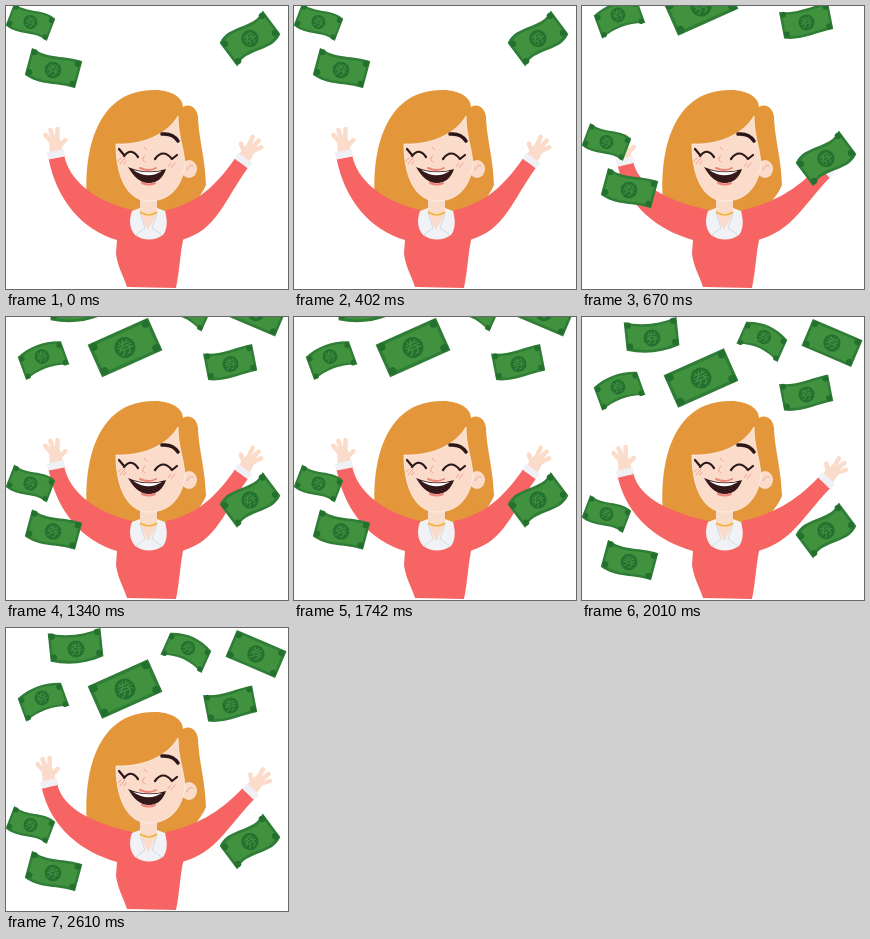
Recreate the animation shown at these times as an HTML page. Size 282 px wide and 283 px high, loop 3010 ms.

```html
<!DOCTYPE html>
<html lang="en">
<head>
<meta charset="utf-8">
<title>Falling money</title>
<style>
  html, body { margin: 0; width: 100%; height: 100%; overflow: hidden; background: #fff; }
  svg { display: block; width: 100%; height: 100%; }
  text { font: 25px "Noto Sans CJK SC", "Noto Sans CJK JP", sans-serif; text-anchor: middle; fill: #429443; }
  .line { fill: none; stroke: #2b1718; stroke-width: 2.2; stroke-linecap: round; stroke-linejoin: round; }
  .pink { fill: none; stroke: #f2a093; stroke-linecap: round; }
  .fingers { fill: none; stroke: #fbdcca; stroke-width: 4.6; stroke-linecap: round; }
  .coral { fill: #f66563; }
  .skin { fill: #fbdcca; }
</style>
</head>
<body>
<svg viewBox="0 0 282 283" preserveAspectRatio="none">
  <!-- hair -->
  <path fill="#e3963a" d="M81 193C78 150 88 84 148 84C165 84 177 91 177 101C183 97 191 101 192 111C193 135 199 150 200 179C194 193 184 202 173 207H122C105 205 90 200 81 193Z"/>
  <g id="arms"></g>
  <path class="coral" d="M108 203L142 208L178 203V230C174 246 174 262 170 282L121 281C118 271 112 262 110 248L111 233Z"/>
  <!-- neck and collar -->
  <path fill="#f1f2f5" d="M126 205L134 202H151L159 205C162 216 161 224 157 229Q143 238 129 229C123 222 123 213 126 205Z"/>
  <path class="skin" d="M134 190H151V208L142 224L134 208Z"/>
  <path fill="none" stroke="#d5d9e2" d="M134 207L139 222L130 229M151 207L146 222L156 229"/>
  <path fill="none" stroke="#efb53c" stroke-width="1.600" d="M134 206Q143 212 151 206"/>
  <!-- head -->
  <ellipse class="skin" cx="183" cy="163" rx="8" ry="9"/>
  <path class="pink" d="M181 164Q183 158 187 160"/>
  <path class="skin" stroke="#fdf0e9" stroke-width=".8" d="M110 138C135 139 160 130 172 110C172 130 178 142 179 158C176 183 162 195 143 195C122 195 110 172 110 138Z"/>
  <path class="line" d="M156 128Q167 127 172 135" stroke-width="3.500" style="stroke-width:3.500"/>
  <path class="line" d="M118 150Q125 141 132 151M118 149L113 143M149 153Q157 142 166 153L171 149"/>
  <path class="pink" d="M139 149Q134 154 139 156M138 141L141 144M112 155L115 152M114 158L119 152M118 158L120 155M162 161L165 157M165 162L169 157"/>
  <path fill="#351819" d="M122 161Q141 169 160 163C157 172 151 177 143 177C134 177 128 171 122 161Z"/>
  <path fill="#fff" d="M127 164Q141 168 156 165Q142 174 127 164Z"/>
  <path class="pink" stroke-width="2" style="stroke:#ef8378" d="M134 162Q143 166 150 162M136 177Q143 180 149 177"/>
  <g id="bills"></g>
</svg>
<script>
const arms = document.getElementById('arms');
const bills = document.getElementById('bills');

// A left arm raised to a cuff at x, y; the right one is its mirror image.
const arm = (x, y, turn) => {
  const a = turn * Math.PI / 180, c = Math.cos(a), s = Math.sin(a);
  const at = (u, v) => `${x + u * c - v * s} ${y + u * s + v * c}`;
  return `<path class="coral" d="M${at(-8, 2)}C${at(-8, 44)} 76 224 111 234L127 204C90 196 ${at(8, 28)} ${at(8, 2)}Z"/>
    <g transform="translate(${x} ${y}) rotate(${turn})">
      <g transform="rotate(12)">
        <path class="skin" d="M-6 2L-7 -12Q-4 -19 3 -17L6 -10V2Z"/>
        <path class="fingers" d="M-5 -13L-11 -20M-2 -14L-6 -25M1 -14V-26M3 -9L9 -15"/>
      </g>
      <path fill="#eff1f6" d="M-9 -4H9L8 3H-8Z"/>
    </g>`;
};
const pose = (left, right) =>
  `<g>${arm(...left)}<g transform="translate(287) scale(-1 1)">${arm(...right)}</g></g>`;

arms.innerHTML =
  pose([50, 149, -11], [50, 155, -36]) +
  pose([43, 156, -13], [43, 164, -44]);

// Long edges follow y = arch * s² + wave * (s³ - s) for s from -1 to 1.
const bill = ([x, y, turn, length, arch = 0, wave = 0]) => {
  const a = (4 * wave - arch) / 3, b = (-4 * wave - arch) / 3;
  const shape = (w, h) =>
    `M${-w} ${arch - h}C${-w / 3} ${a - h} ${w / 3} ${b - h} ${w} ${arch - h}` +
    `V${arch + h}C${w / 3} ${b + h} ${-w / 3} ${a + h} ${-w} ${arch + h}Z`;
  const notches = [-43, 43].map(cx => [-20, 20].map(cy =>
    `<circle cx="${cx}" cy="${cy + arch}" r="6"/>`).join('')).join('');
  return `<g fill="#24702f" transform="translate(${x} ${y}) rotate(${turn}) scale(${length / 100})">
    <path fill="#2f7d36" d="${shape(50, 27)}"/>
    <path fill="#40923f" d="${shape(45, 22)}"/>${notches}
    <circle r="16"/><text y="9">券</text></g>`;
};

bills.innerHTML = [
  [24.5, 197, 21, 44, 0, 10],
  [47, 245, 15, 52, -4, 6],
  [244, 213.5, -37, 54, 0, -14],
  [36, 70, -20, 46, 10],
  [119, 61, -24, 66],
  [224.5, 77.5, -11, 50, -4, 4],
  [70, 21, -6, 53, -8],
  [182, 20, 24, 45, 12],
  [250, 26, 23, 54]
].map(bill).join('');

function draw() {
  const step = Math.min(3, Math.floor(performance.now() % 3010 / 670));
  const drop = step ? 30.5 * (step - 3) : -181;
  bills.setAttribute('transform', `translate(0 ${drop})`);
  [...arms.children].forEach((g, i) => g.style.display = i === step % 2 ? '' : 'none');
  requestAnimationFrame(draw);
}
draw();
</script>
</body>
</html>
```
